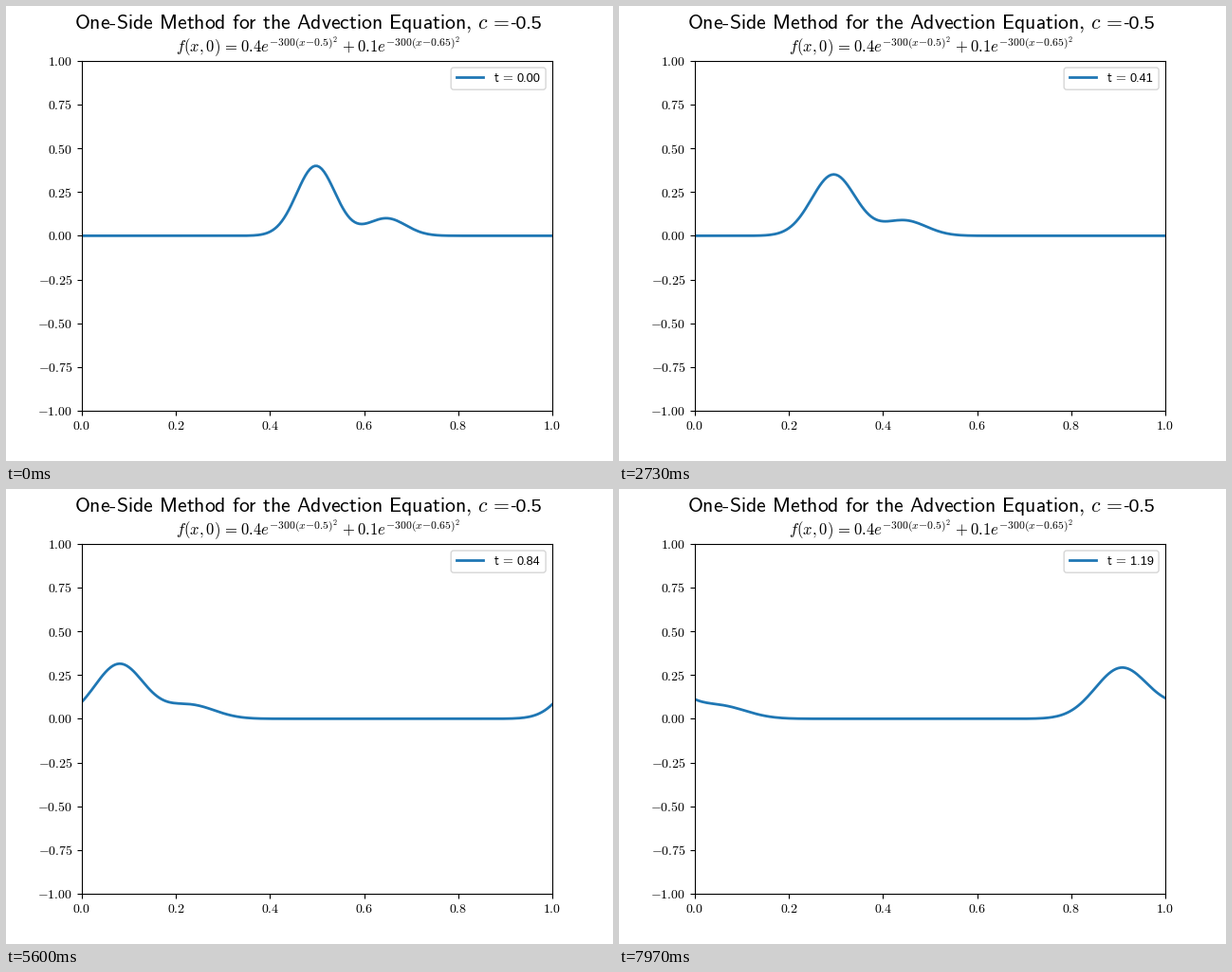
Animation, 640 px wide and 480 px high, one loop 8.01 s. Source, as a matplotlib script:

```python
import numpy as np
import matplotlib.pyplot as plt
from matplotlib.animation import FuncAnimation
from matplotlib.patches import FancyBboxPatch

# The serif family also sets the line height used to align tick labels
plt.rcParams.update({"mathtext.fontset": "cm", "font.family": "Liberation Serif"})

W, H, DPI = 640, 480, 100
FRAMES, LOOP_MS = 240, 8010
C, DX, DT = -0.5, 0.005, 0.005
BLUE = "#1f77b4"
SPACE = r"\hspace{0.38}"


def sans(text):
    """Upright sans-serif mathtext with word spaces and true hyphens."""
    words = []
    for word in text.split():
        words.append(r"\text{-}".join(rf"\mathsf{{{p}}}" for p in word.split("-")))
    return SPACE.join(words)


def solve():
    """One-sided scheme with periodic ends; each row is stored after its step."""
    x = np.linspace(0, 1, 201)
    u = 0.4 * np.exp(-300 * (x - 0.5) ** 2) + 0.1 * np.exp(-300 * (x - 0.65) ** 2)
    t, times, rows = 0.0, [], []
    for _ in range(FRAMES):
        u = u - C * DT / DX * (np.roll(u, -1) - u)
        times.append(t)
        rows.append(u)
        t += DT
    return x, times, rows


x, times, rows = solve()

fig = plt.figure(figsize=(W / DPI, H / DPI), dpi=DPI, facecolor="white")
ax = fig.add_axes([0.125, 0.11, 0.775, 0.77])
ax.set(xlim=(0, 1), ylim=(-1, 1))
xticks = np.linspace(0, 1, 6)
yticks = np.linspace(-1, 1, 9)
ax.set_xticks(xticks, [f"${v:.1f}$" for v in xticks])
ax.set_yticks(yticks, [f"${v:.2f}$" for v in yticks])
wave, = ax.plot(x, rows[0], color=BLUE, lw=2)

# Overlay in pixel coordinates for titles and legend
top = fig.add_axes([0, 0, 1, 1])
top.set(xlim=(0, W), ylim=(H, 0))
top.axis("off")


def label(x, y, text, size, ha="left", **kw):
    return top.text(x, y, text, size=size, ha=ha, va="baseline", **kw)


heading = (sans("One-Side Method for the Advection Equation,") + r"\hspace{0.18}"
           + SPACE + r"c\hspace{0.316}\text{=}")
heading = heading.replace(r"\hspace{0.18}" + SPACE, r"\hspace{0.18}")
label(72, 24, f"${heading}$", 15.65)
label(564.8, 24, "-0.5", 14, "right", family="Liberation Sans")

formula = (r"f(x,0)\hspace{0.11}=\hspace{0.11}0.4e^{-300(x{-}0.5)^2}"
           r"\hspace{0.05}+\hspace{0.05}0.1e^{-300(x{-}0.65)^2}")
label(329, 49.3, f"${formula}$", 12, "center")

top.add_patch(FancyBboxPatch(
    (469.2, 65), 99.9, 23.2, boxstyle="round,pad=0,rounding_size=2.78",
    fc=(1, 1, 1, 0.8), ec=(0.8, 0.8, 0.8, 0.8), lw=1))
top.plot([474.8, 502.6], [74.5, 74.5], color=BLUE, lw=2)
label(513.7, 80, rf"$\mathsf{{t}}{SPACE}\text{{=}}$", 10)
clock = label(538.8, 80, "0.00", 9.2, family="Liberation Sans")


def update(k):
    wave.set_ydata(rows[k])
    clock.set_text(f"{times[k]:.2f}")
    return wave, clock


anim = FuncAnimation(fig, update, frames=FRAMES, interval=LOOP_MS / FRAMES,
                     repeat=True, repeat_delay=0)
plt.show()
```
